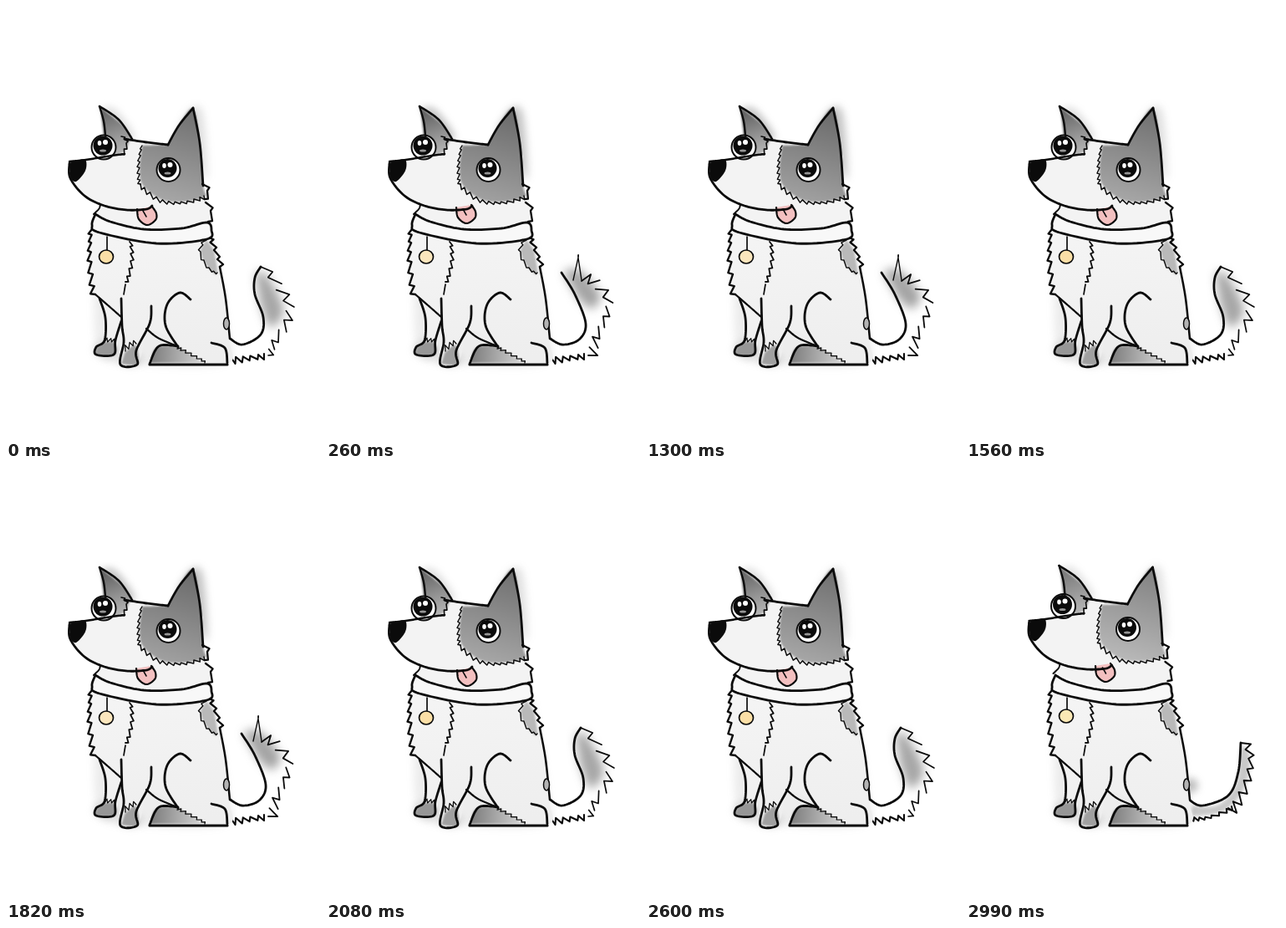
Animation of 376x518 px, one loop 3.12 s. Source, as an HTML page with a canvas:

```html
<!DOCTYPE html>
<html lang="en">
<head>
<meta charset="utf-8">
<title>Happy dog</title>
<style>
html, body { margin: 0; width: 100%; height: 100%; overflow: hidden; background: #fff; }
canvas { display: block; }
</style>
</head>
<body>
<canvas id="stage" width="376" height="518"></canvas>
<script>
const ctx = document.getElementById('stage').getContext('2d');
const STEP = 130;
const INK = '#0b0b0b';
const gray = (level, alpha) => `rgba(${level},${level},${level},${alpha})`;
const parse = text => text.split(' ').map(pair => pair.split(',').map(Number));

// Point on the Catmull-Rom spline through p, u from 0 to 1.
function along(p, u) {
  const s = u * (p.length - 1);
  const i = Math.max(0, Math.min(Math.floor(s), p.length - 2));
  const t = s - i;
  const b = p[i], c = p[i + 1], a = p[i - 1] || b, d = p[i + 2] || c;
  return [0, 1].map(k => b[k] + t / 2 * (c[k] - a[k]
    + t * (2 * a[k] - 5 * b[k] + 4 * c[k] - d[k]
    + t * (3 * b[k] - a[k] - 3 * c[k] + d[k]))));
}

function spline(text) {
  const p = parse(text), path = new Path2D(), n = p.length * 10;
  for (let i = 0; i <= n; i++) path.lineTo(...along(p, i / n));
  return path;
}

function line(text, width = 2.8) {
  ctx.strokeStyle = INK;
  ctx.lineWidth = width;
  ctx.stroke(spline(text));
}

function wash(text, color, blur = 0) {
  ctx.filter = blur ? `blur(${blur}px)` : 'none';
  ctx.fillStyle = color;
  ctx.fill(spline(text));
  ctx.filter = 'none';
}

function shape(text, color, width) {
  wash(text, color);
  line(text, width);
}

// Teeth leaning forward along a guide; positive depth grows to the left of travel.
function fur(text, teeth, depth, width = 1.6, broken = false) {
  const p = parse(text), path = new Path2D();
  path.moveTo(...p[0]);
  for (let i = 0; i < teeth; i++) {
    const a = along(p, i / teeth), b = along(p, (i + 1) / teeth);
    const dx = b[0] - a[0], dy = b[1] - a[1];
    const wobble = Math.abs(Math.sin((i + 1) * 12.9 + p[0][0])) * 0.6 + 0.7;
    const reach = depth * wobble / Math.hypot(dx, dy);
    path.lineTo(a[0] + dx * 0.85 + dy * reach, a[1] + dy * 0.85 - dx * reach);
    if (broken && i % 2) path.moveTo(...b);
    else path.lineTo(...b);
  }
  ctx.strokeStyle = INK;
  ctx.lineWidth = width;
  ctx.stroke(path);
}

function oval(x, y, rx, ry, color, outline = 0, blur = 0) {
  ctx.beginPath();
  ctx.ellipse(x, y, rx, ry, 0, 0, Math.PI * 2);
  ctx.filter = blur ? `blur(${blur}px)` : 'none';
  ctx.fillStyle = color;
  ctx.fill();
  ctx.filter = 'none';
  if (outline) {
    ctx.strokeStyle = INK;
    ctx.lineWidth = outline;
    ctx.stroke();
  }
}

function shifted(dx, dy, draw) {
  ctx.save();
  ctx.translate(dx, dy);
  draw();
  ctx.restore();
}

function shade(x0, y0, x1, y1, from, to) {
  const g = ctx.createLinearGradient(x0, y0, x1, y1);
  g.addColorStop(0, gray(from, 1));
  g.addColorStop(1, gray(to, 1));
  return g;
}

const curl = {
  lift: 0, tongue: 2, coat: 112, halo: 0.18, tag: '#fbdfa6',
  tail() {
    wash('299,322 308,318 326,345 332,368 316,384 304,355', gray(80, 0.5), 6);
    line('267,397 283,405 305,393 308,372 298,345 298,325 305,312');
    fur('305,312 322,337 335,360 331,380 317,402 314,418', 9, 8, 1.7, true);
    fur('269,420 288,419 309,416', 5, -7, 2.1);
  }
};

const left = {
  lift: 0, tongue: 0, coat: 106, halo: 0.34, tag: '#fbe6bd',
  tail() {
    wash('284,318 303,316 328,345 318,362 302,350', gray(75, 0.5), 6);
    line('267,397 283,405 303,399 311,380 298,345 282,319');
    line('296,328 302,301 302,301 306,328', 1.4);
    fur('306,329 321,337 335,355 330,376 318,398 314,418', 9, 9, 1.8, true);
    fur('269,420 288,419 309,416', 5, -7, 2.1);
  }
};

const right = {
  lift: -2, tongue: -1, coat: 130, halo: 0.16, tag: '#fbe8b5',
  tail() {
    oval(270, 381, 8, 9, gray(100, 0.4), 0, 4);
    wash('270,405 302,404 324,378 329,335 340,348 333,385 308,412 270,418', gray(125, 0.42), 2);
    line('267,398 283,405 314,393 326,365 329,330');
    fur('329,330 338,346 335,368 325,392 314,408', 7, 9, 1.9);
    fur('269,419 290,418 318,406', 7, -4, 2);
  }
};

const CYCLE = [curl, right, left, right];

function drawBody() {
  wash('100,275 104,345 112,416 156,429 262,428 266,385 247,275', gray(120, 0.13), 4);
  oval(120, 411, 16, 11, gray(110, 0.18), 0, 4);
  oval(149, 423, 15, 9, gray(110, 0.18), 0, 4);

  wash('104,267 101,300 107,345 120,372 117,404 108,417 130,417 138,376 137,428 158,428 172,389 204,407 173,428 264,428 267,398 262,335 242,276', shade(150, 280, 170, 430, 244, 238));
  wash('118,402 130,403 130,417 108,417 109,408', gray(150, 1), 1);
  wash('142,415 155,406 158,428 138,428', gray(160, 1), 1);
  wash('173,427 180,409 205,408 236,427', shade(174, 420, 238, 424, 125, 215), 1);

  // chest and front legs
  fur('103,267 102,300 107,345', 7, -4.5, 2.4);
  line('107,345 122,358 138,372', 2.2);
  line('112,350 119,373 118,400 108,408 108,417 129,417 131,400 138,377');
  fur('118,402 130,402', 3, 4, 1.2);
  fur('148,282 149,305 143,330', 6, 3, 1.8);
  line('143,333 141,345', 1.7);
  line('138,350 139,383 141,402 137,429 157,429 156,412 172,380 174,359');
  fur('143,413 156,404', 3, 5, 1.3);

  // haunch and hind paw
  line('168,386 182,397 205,407', 2.3);
  line('221,351 208,343 193,357 191,382 206,408');
  line('206,407 183,407 172,428');
  line('172,429 265,429', 3.1);
  fur('205,410 238,427', 6, 2.5, 1.3);
  line('246,403 262,409 265,427');

  // back
  wash('240,280 233,295 243,314 253,320 249,292', gray(185, 1), 1);
  fur('240,280 233,294 243,313 253,319', 6, -2.5, 1.4);
  fur('241,276 249,292 256,312', 4, 5, 2.3);
  line('256,312 263,350 268,398', 2.5);
  oval(264, 380, 3.5, 7, gray(180, 1), 1.5);
}

function drawCollar(pose) {
  const y = 300 + pose.lift;
  line(`121,276 121,${y - 8}`, 1.7);
  oval(120, y, 8.5, 8, pose.tag, 1.7);
  shape('107,249 125,258 165,267 210,266 240,259 246,268 240,279 180,284 112,271 103,262 107,249', gray(248, 1), 2.8);
}

function drawEye(x, y, radius) {
  oval(x, y, radius, radius, '#fff', 2);
  oval(x - 1, y - 2, radius - 3, radius - 3, INK);
  oval(x - 5, y - 5, 2.3, 3, '#fff');
  oval(x + 2, y - 6, 3, 3, '#fff');
  oval(x - 1, y + 4, 4, 1.6, gray(150, 1));
}

function drawHead(pose) {
  const halo = gray(90, pose.halo);
  wash('113,121 132,124 155,156 140,160', halo, 4);
  wash('205,146 222,122 236,130 241,205 230,190', halo, 5);

  // skull, muzzle and neck
  wash('113,238 108,249 155,264 210,266 241,259 245,243 234,200 233,175 194,166 145,160 119,160 102,182 77,187 76,202 90,225', gray(243, 1));
  wash('113,121 146,150 143,172 127,177 117,158', shade(120, 128, 138, 175, pose.coat - 6, 180), 1);
  wash('163,167 194,166 194,166 207,143 224,123 232,164 236,215 238,228 212,234 185,231 163,213 160,190', shade(222, 125, 190, 236, pose.coat, pose.coat + 56), 1);

  drawEye(117, 169 + pose.lift / 4, 14.5);
  drawEye(194.5, 196, 14);

  line('119,155 117,138 112,120', 2.4);
  line('112,120 135,136 151,159', 2.6);
  fur('138,156 144,164 138,177', 4, 3);
  line('142,159 168,163 194,166');
  line('194,166 207,143 224,122');
  line('224,122 232,164 236,215');
  fur('235,213 241,221 238,231', 2, 5, 2.3);
  fur('163,167 160,190 161,213', 7, -2.5, 1.4);
  fur('161,213 185,231 212,234 237,227', 11, -3.5, 1.5);
  fur('239,235 245,245 242,258', 2, 4, 2.3);
  line('113,238 111,243 105,249', 2);

  shifted(pose.tongue / 2, pose.tongue, () =>
    shape('156,241 158,253 168,260 178,254 179,246 174,238', '#f3c0c0', 2.2));
  line(`164,${243 + pose.tongue} 168,${250 + pose.tongue}`, 1.6);

  line('76,186 96,184 120,180 142,177', 2.5);
  line('76,188 77,206 94,227 118,239 145,244 168,243 175,239');
  wash('76,188 83,185 95,184 95,197 84,210 77,206', INK);
}

function drawPose(pose) {
  ctx.fillStyle = '#fff';
  ctx.fillRect(0, 0, 376, 518);
  ctx.lineCap = ctx.lineJoin = 'round';
  pose.tail();
  drawBody();
  shifted(pose.lift / 4, pose.lift, () => drawHead(pose));
  drawCollar(pose);
}

let shown = null;
function tick() {
  const pose = CYCLE[Math.floor(performance.now() / STEP) % CYCLE.length];
  if (pose !== shown) drawPose(shown = pose);
  requestAnimationFrame(tick);
}
tick();
</script>
</body>
</html>
```
